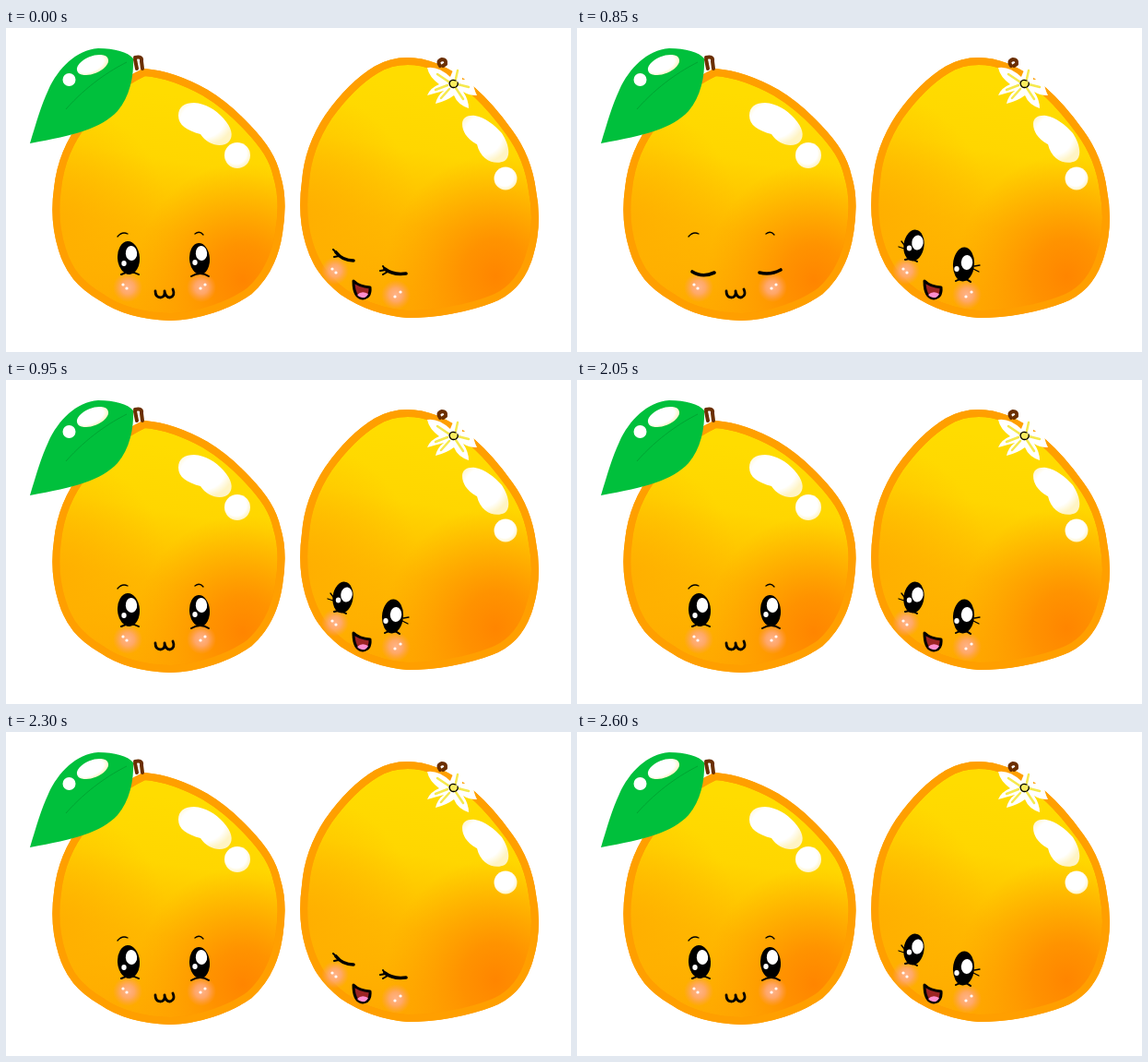
An HTML page that plays this animation: 613x351 px, repeating every 3.85 s.

```html
<!DOCTYPE html>
<html lang="en">
<head>
<meta charset="utf-8">
<title>Two blinking oranges</title>
<style>
html, body { margin: 0; width: 100%; height: 100%; overflow: hidden; background: #fff; }
svg { display: block; width: 613px; height: 351px; }
.ink { fill: none; stroke: #000; stroke-width: 2; stroke-linecap: round; stroke-linejoin: round; }
.lid { stroke-width: 3.6; }
.thin { stroke-width: 1.3; }
.rind { stroke: #ff9f00; stroke-width: 8; stroke-linejoin: round; }
.stem { fill: none; stroke: #6b2f00; stroke-width: 4; stroke-linecap: round; stroke-linejoin: round; }
.blush { fill: url(#blush); }
.white { fill: #fff; }
</style>
</head>
<body>
<svg viewBox="0 0 613 351">
  <defs>
    <linearGradient id="skin" x1=".58" y1="0" x2=".42" y2="1">
      <stop offset=".1" stop-color="#ffdc00"/>
      <stop offset=".36" stop-color="#ffd600"/>
      <stop offset=".65" stop-color="#ffb900"/>
      <stop offset="1" stop-color="#ffa800"/>
    </linearGradient>
    <radialGradient id="shade" cx=".83" cy=".85" r=".48">
      <stop offset="0" stop-color="#ff8500"/>
      <stop offset=".3" stop-color="#ff8c00" stop-opacity=".85"/>
      <stop offset="1" stop-color="#ff9c00" stop-opacity="0"/>
    </radialGradient>
    <radialGradient id="side" cx="0" cy=".62" r=".5">
      <stop offset="0" stop-color="#ffae00" stop-opacity=".9"/>
      <stop offset="1" stop-color="#ffb400" stop-opacity="0"/>
    </radialGradient>
    <radialGradient id="blush">
      <stop offset="0" stop-color="#ffb48c"/>
      <stop offset=".45" stop-color="#ffa878" stop-opacity=".85"/>
      <stop offset="1" stop-color="#ff9c60" stop-opacity="0"/>
    </radialGradient>
    <radialGradient id="shine" cx=".45" cy=".42" r=".58">
      <stop offset=".7" stop-color="#fff"/>
      <stop offset="1" stop-color="#fff4c4"/>
    </radialGradient>
    <path id="left" d="M150 48C176 50 198 60 216 70C236 82 249 94 262 108C280 127 290 142 294 161C300 180 299 204 296 222C292 248 282 269 264 285C242 301 208 312 178 313C150 312 124 306 104 292C80 278 68 263 61 240C54 218 53 195 56 174C59 145 70 121 86 101C103 79 124 60 150 48Z"/>
    <path id="right" d="M436 36C457 36 474 45 490 55C512 70 531 92 546 113C560 132 568 153 571 176C576 201 574 226 568 246C561 270 548 286 526 294C500 304 465 310 436 310C409 308 387 300 366 286C344 269 335 253 329 233C322 210 322 188 325 166C327 140 336 117 350 96C365 75 382 57 402 45C412 39 424 36 436 36Z"/>
  </defs>

  <g id="stage">
    <use href="#left" class="rind" fill="url(#skin)"/>
    <use href="#left" fill="url(#side)"/>
    <use href="#left" fill="url(#shade)"/>
    <use href="#left" class="rind" fill="none"/>
    <path class="stem" d="M140 34L142 44M140 32Q148 30 147 36L148 44"/>
    <path fill="#00c03c" d="M26 125C33 102 38 84 46 67C57 43 76 24 100 22C118 22 132 26 138 33C139 52 134 75 121 90C103 109 75 116 26 125Z"/>
    <path fill="none" stroke="#00a432" d="M131 37C113 46 88 62 65 88"/>
    <ellipse cx="94" cy="40" rx="18" ry="9.5" transform="rotate(-22 94 40)" fill="url(#shine)"/>
    <circle cx="68.500" cy="56" r="7" class="white"/>
    <path fill="url(#shine)" d="M187 95C187 85 194 81 204 81C217 82 227 88 236 98C245 108 247 117 242 123C236 130 219 128 211 115C196 111 187 105 187 95Z"/>
    <circle cx="251" cy="138" r="14" fill="url(#shine)"/>

    <use href="#right" class="rind" fill="url(#skin)"/>
    <use href="#right" fill="url(#side)"/>
    <use href="#right" fill="url(#shade)"/>
    <use href="#right" class="rind" fill="none"/>
    <path class="stem" stroke-width="3" d="M471 41Q467 36 473 34Q478 34 477 39L474 41"/>
    <path class="white" d="M482 53Q486 42 491 38Q496 47 495 56Q504 55 507 61Q508 67 511 73Q502 73 496 69Q502 78 502 87Q490 83 486 73Q478 79 466 82Q468 73 475 68Q464 71 457 73Q460 65 470 61Q459 53 457 43Q469 41 482 53Z"/>
    <path fill="none" stroke="#f6e94d" stroke-width="2.500" stroke-linecap="round" d="M488 55L490 46M490 61L502 64M488 65L496 77M481 66L472 76M480 58L468 50M479 62L466 67"/>
    <circle cx="485.500" cy="60.500" r="5" fill="#f9ec60"/>
    <path class="ink thin" stroke-width="1.500" d="M488 57Q482 55 481 60Q482 66 488 64Q491 62 490 59"/>
    <path fill="url(#shine)" d="M495 104C495 97 501 94 509 95C520 97 530 105 538 114C546 126 548 139 541 144C531 149 515 144 511 126C500 120 495 112 495 104Z"/>
    <circle cx="542" cy="163" r="12.500" fill="url(#shine)"/>

    <circle class="blush" cx="132" cy="281" r="16"/>
    <circle class="blush" cx="212" cy="281" r="16"/>
    <circle class="blush" cx="357" cy="263" r="15"/>
    <circle class="blush" cx="423" cy="289" r="16"/>

    <path class="ink thin" d="M121 226Q126 220 132 223M205 223Q210 219 214 224"/>
    <path class="ink" style="stroke-width:2.800" d="M162 285Q162 292 168 292Q173 291 172 285Q173 292 178 292Q184 290 181 283"/>
    <path class="ink" style="fill:#9d2424;stroke-width:3" d="M377 274Q383 280 395 281Q396 292 387 293Q377 292 377 274Z"/>
    <path fill="#ff8fd0" d="M381 289Q386 284 393 288Q391 293 386 292Q383 292 381 289Z"/>

    <g id="leftOpen">
      <path class="ink" d="M125 267Q135 262 144 267M201 269Q211 263 220 269"/>
    </g>
    <path id="leftShut" class="ink lid" d="M125 264Q136 271 149 265M198 265Q210 268 221 262"/>
    <g id="rightOpen">
      <path class="ink" d="M356 251Q363 249 369 253M411 274Q420 269 427 275"/>
      <path class="ink thin" d="M355 239L349 237M355 235L352 231M431 258L437 257M430 261L436 264"/>
    </g>
    <g id="rightShut">
      <path class="ink lid" d="M358 243Q365 252 377 252M411 261Q420 268 434 266"/>
      <path class="ink" d="M360 245L355 240M361 247L356 248M412 262L406 263M414 264L409 267M411 261L409 258"/>
    </g>
  </g>
</svg>
<script>
const $ = id => document.getElementById(id);

function ellipse(parent, cx, cy, rx, ry, fill, tilt = 0) {
  const e = document.createElementNS("http://www.w3.org/2000/svg", "ellipse");
  const attrs = { cx, cy, rx, ry, fill, transform: `rotate(${tilt} ${cx} ${cy})` };
  for (const k in attrs) e.setAttribute(k, attrs[k]);
  parent.append(e);
}

// Pupil, large glint offset (gx, gy), small glint offset (sx, sy)
function eye(parent, x, y, rx, ry, gx, gy, sx, sy, tilt) {
  ellipse(parent, x, y, rx, ry, "#000", tilt);
  ellipse(parent, x + gx, y + gy, 6.2, 8, "#fff", tilt);
  ellipse(parent, x + sx, y + sy, 2.7, 3, "#fff");
}

eye($("leftOpen"), 133, 249, 12, 18, 3, -5, -5, 6, -4);
eye($("leftOpen"), 210, 250, 11, 17, 2, -6, -5, 4, -4);
eye($("rightOpen"), 365.5, 235.5, 11, 17, 4, -3, -5, 3, 8);
eye($("rightOpen"), 419.5, 256, 11.5, 18.5, 3.5, -2, -7.5, 5, 4);

const sparkles = [[127, 278], [131, 282], [216, 278], [211, 282],
  [354, 261], [358, 265], [428, 286], [422, 291]];
for (const [x, y] of sparkles) ellipse($("stage"), x, y, 1.6, 1.6, "#fff");

const LOOP = 3850, BLINK = 100;
const blinks = { left: [850], right: [0, 1950, 2300, 2500] };
const start = performance.now();

function draw(now) {
  const t = Math.max(0, now - start) % LOOP;
  for (const side in blinks) {
    const shut = blinks[side].some(b => t >= b && t < b + BLINK);
    $(side + "Open").style.display = shut ? "none" : "";
    $(side + "Shut").style.display = shut ? "" : "none";
  }
  requestAnimationFrame(draw);
}
draw(start);
</script>
</body>
</html>
```
